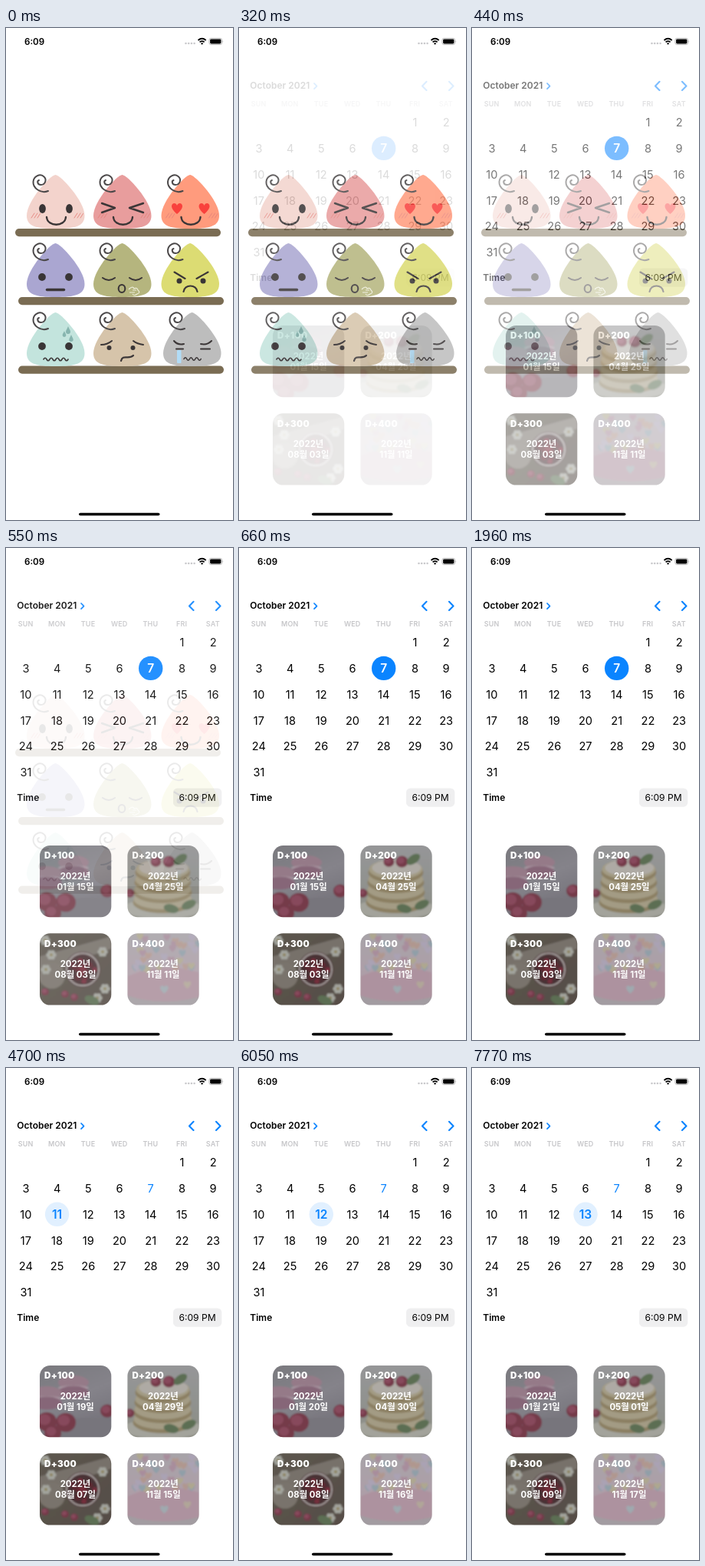
Write an HTML page that moves like this. It is 296x640 px and loops after 8 s.

```html
<!DOCTYPE html>
<html lang="en">
<head>
<meta charset="utf-8">
<title>Baby day calendar</title>
<style>
  html, body { margin: 0; width: 100%; height: 100%; overflow: hidden; background: #fff; }
  svg { display: block; width: 100%; height: 100%; font-family: Inter, "Noto Sans CJK KR", "Noto Sans CJK", sans-serif; }
  .ink { fill: none; stroke: #3b3637; stroke-width: 2.4; stroke-linecap: round; stroke-linejoin: round; }
  .curl { fill: none; stroke: #4b4849; stroke-width: 2; stroke-linecap: round; }
  .blush { fill: none; stroke: #e5827c; stroke-width: .9; stroke-linecap: round; }
  .mid { text-anchor: middle; }
  .day { font-size: 14.6px; text-anchor: middle; }
  .chosen { font-size: 15.6px; font-weight: 600; }
  .week { font-size: 9px; font-weight: 600; fill: #c6c6c9; text-anchor: middle; letter-spacing: .15px; }
  .label { font-size: 12px; font-weight: 600; }
  .count { font-size: 11.6px; font-weight: 900; fill: #fff; letter-spacing: .3px; }
  .date { font-size: 11.4px; font-weight: 700; fill: #fff; text-anchor: middle; }
  .arrow { fill: none; stroke: #0a84ff; stroke-linecap: round; stroke-linejoin: round; }
  #calendar { animation: appear 8s step-end infinite; }
  .pick { visibility: hidden; animation: 8s step-end infinite; }
  #pick7 { animation-name: first; }
  #pick11 { animation-name: second; }
  #pick12 { animation-name: third; }
  #pick13 { animation-name: fourth; }
  @keyframes appear { 0% { opacity: 0 } 4% { opacity: .14 } 5.375% { opacity: .53 } 6.875% { opacity: .89 } 8.25%, 100% { opacity: 1 } }
  @keyframes first { 0% { visibility: visible } 58.75%, 100% { visibility: hidden } }
  @keyframes second { 0% { visibility: hidden } 58.75% { visibility: visible } 75.625%, 100% { visibility: hidden } }
  @keyframes third { 0% { visibility: hidden } 75.625% { visibility: visible } 97.125%, 100% { visibility: hidden } }
  @keyframes fourth { 0% { visibility: hidden } 97.125%, 100% { visibility: visible } }
</style>
</head>
<body>
<svg id="stage" viewBox="0 0 296 640" preserveAspectRatio="none">
  <defs>
    <clipPath id="rounded"><rect width="93.3" height="93.3" rx="13.5"/></clipPath>
    <filter id="soft" x="-20%" y="-20%" width="140%" height="140%"><feGaussianBlur stdDeviation="1"/></filter>
    <linearGradient id="linen" x2=".4" y2="1"><stop stop-color="#77777c"/><stop offset=".55" stop-color="#85838a"/><stop offset="1" stop-color="#727078"/></linearGradient>
    <linearGradient id="cream" x2="0" y2="1"><stop stop-color="#97979a"/><stop offset=".6" stop-color="#8f918d"/><stop offset="1" stop-color="#8b8c80"/></linearGradient>
    <linearGradient id="wood" x2="1" y2="1"><stop stop-color="#5d5850"/><stop offset="1" stop-color="#554c45"/></linearGradient>
    <linearGradient id="frosting" x2="0" y2="1"><stop stop-color="#a6a4a8"/><stop offset=".5" stop-color="#ad9fa8"/><stop offset="1" stop-color="#a8969f"/></linearGradient>
  </defs>
  <g id="shelves"></g>
  <g id="calendar"></g>
  <g id="chrome">
    <text x="24" y="21.7" font-size="11.6" font-weight="600">6:09</text>
    <g fill="#c9c9cc"><circle cx="234.5" cy="20" r="1.3"/><circle cx="238.2" cy="20" r="1.3"/><circle cx="241.9" cy="20" r="1.3"/><circle cx="245.6" cy="20" r="1.3"/></g>
    <g fill="none" stroke="#000" stroke-width="1.8"><path d="M250.5 16q5.1-4.4 10.2 0M252.6 18.4q3-2.5 6 0"/></g>
    <path d="M253.9 20q1.7-1.3 3.4 0l-1.7 1.8z"/>
    <rect x="264.9" y="13.4" width="16.7" height="8.2" rx="2.4" fill="none" stroke="#aaa" stroke-width=".8"/>
    <rect x="266.1" y="14.6" width="14.3" height="5.8" rx="1.4"/>
    <path d="M282.5 16.1q1.5 1.4 0 2.8z" fill="#aaa"/>
    <rect x="95" y="630.7" width="105.5" height="3.6" rx="1.8"/>
  </g>
</svg>
<script>
const $ = id => document.getElementById(id);
const ink = (d, width = 2.4) => `<path class="ink" style="stroke-width:${width}" d="${d}"/>`;
const oval = (x, y, rx, ry = rx, fill = '#393536') => `<ellipse cx="${x}" cy="${y}" rx="${rx}" ry="${ry}" fill="${fill}"/>`;
const eyes = (y, rx, ry, left = 20, right = 55) => oval(left, y, rx, ry) + oval(right, y, rx, ry);
const text = (cls, x, y, content, more = '') => `<text class="${cls}" x="${x}" y="${y}" ${more}>${content}</text>`;
const wave = (x, y, step, count) => `M${x} ${y}q${step / 2}-3.6 ${step} 0` + `t${step} 0`.repeat(count - 1);

// Faces use coordinates relative to the top left of each body.
const blush = [6, 62].map(x => `<path class="blush" d="M${x} 56l4-6m0 6l4-6m0 6l3.5-5.5"/>`).join('');
const smile = ink('M26 55C27 68 50 68 51 55');
const heart = (x, y, s, fill) =>
  `<path transform="translate(${x} ${y}) scale(${s})" fill="${fill}" d="M0 7C-5 3-7-1-7-3C-7-8-1-8 0-4C1-8 7-8 7-3C7-1 5 3 0 7Z"/>`;
const drop = (x, y, s, fill) =>
  `<path transform="translate(${x} ${y}) scale(${s})" fill="${fill}" d="M0-5C1-2 3 0 3 2A3 3 0 0 1-3 2C-3 0-1-2 0-5Z"/>`;

const babies = [
  [27, 191, '#f3d3cc', eyes(44, 4.4, 6, 20.5, 55.5) + smile + blush],
  [114, 191, '#e89d9d', ink('M11 37L28 43L11 49M65 37L47 43L65 49') + smile + blush],
  [202.5, 191, '#ff9b7d', heart(20.5, 44, 1, '#f9413d') + heart(56, 44, 1, '#f9413d') + smile + blush],
  [27, 280, '#aaa6d1', eyes(44, 4.9) + ink('M26.5 60.5H48.5', 3.5)],
  [114, 280, '#b5b57e', ink('M12 45Q20 51 28 45M47 45Q55 51 63 45', 2.1) +
    '<ellipse class="ink" style="stroke-width:2.1" cx="37" cy="59" rx="4.3" ry="5"/>' +
    '<path d="M46 60q5-5 7-1q4-2 5 2q4 3-1 5q-4 3-6 0m-4-2h7m-3-3h5" fill="none" stroke="#eeeedb" stroke-width="1.2"/>'],
  [202.5, 280, '#dcdc73', ink('M17 37.5L31 46M61 37.5L46 46', 2.1) + eyes(49, 3.5, 3.5, 23.5, 54.5) +
    ink('M29 63C30 53 46 53 47 63', 2.2)],
  [27, 370, '#c3e4dd', eyes(44, 4.9) + ink(wave(22, 61, 4, 8), 1.6) +
    drop(54, 23, 1, '#87b5af') + drop(49, 28, .8, '#87b5af') + drop(58, 33.5, .9, '#87b5af')],
  [114, 370, '#d6c4aa', ink('M10 42Q18 42 24 37M52 37Q57 41 65 42', 2) + eyes(46, 3, 3, 20.5, 51.5) +
    ink('M36 63C38 54 46 62 52 56', 2.2)],
  [205, 370, '#bdbdbd', ink('M14 37Q19 43 27 41M49 41Q57 43 63 37M17 47.5H26M49 47.5H61', 2) +
    '<rect x="18" y="49" width="5.5" height="17" rx="1" fill="#b1dcf6"/>' + ink(wave(27, 60.5, 3.7, 6), 1.6)]
];
const body = 'M37.5 0C44 0 75.5 34 75.5 53C75.5 67 63 70 37.5 70C12 70 0 67 0 53C0 34 31 0 37.5 0Z';
const curl = 'M28 21C18 25 8 17 8.5 9C9 2 17-2 22 2C27 6 24 13 18.5 13C14 13 13 8 16 7';
$('shelves').innerHTML =
  [[12, 261], [16, 350], [16, 439.5]].map(([x, y]) =>
    `<rect x="${x}" y="${y}" width="268" height="10.2" rx="5.1" fill="#7a6c53"/>`).join('') +
  babies.map(([x, y, fill, face]) => `<g transform="translate(${x} ${y})">
    <path d="${body}" fill="${fill}"/><path class="curl" d="${curl}"/>${face}</g>`).join('');

// Soft stand-ins for the four dessert pictures, each about 93 by 93.
let seed = 7;
const random = () => (seed = seed * 16807 % 2147483647) / 2147483647;
const scatter = (count, draw) => Array.from({ length: count }, draw).join('');
const backdrop = id => `<rect x="-9" y="-9" width="112" height="112" fill="url(#${id})"/>`;
const berry = (x, y, r) => oval(x, y, r, r * .95, '#743a4a') + oval(x - r * .2, y - r * .2, r * .6, r * .55, '#87495c');
const macaron = (x, y, r) => oval(x, y - 6, r, r * .45, '#957a88') + oval(x, y + 1, r, 3, '#a795a0') + oval(x, y + 7, r, r * .42, '#866678');
const flower = (x, y) => scatter(6, (_, i) => oval(x + 4 * Math.cos(i * 1.05), y + 4 * Math.sin(i * 1.05), 2.6, 2.6, '#a3a49d')) + oval(x, y, 2, 2, '#8d845e');
const leaf = (x, y, turn) => `<ellipse rx="10" ry="5.5" fill="#5b6e53" transform="translate(${x} ${y}) rotate(${turn})"/>`;

const photos = [
  backdrop('linen') + macaron(44, 28, 20) + macaron(9, 42, 20) + oval(61, 82, 42, 14, '#77757c') +
    berry(88, 59, 9) + berry(9, 73, 13) + berry(34, 74, 13) + berry(17, 88, 11),
  backdrop('cream') + oval(46, 82, 52, 13, '#a3a39b') +
    [74, 61, 48, 35].map((y, i) => oval(46, y, 39 - i, 14, '#8b7f62') + oval(46, y - 4, 38 - i, 13, '#a39b84')).join('') +
    oval(47, 29, 32, 11, '#aeaaa4') + berry(37, 21, 7) + berry(54, 21, 8) + leaf(69, 18, -35) +
    leaf(57, 82, 15) + leaf(80, 77, -25) + berry(3, 62, 6),
  backdrop('wood') + '<path d="M0 30L93 4V20L0 52Z" fill="#77716a"/>' + oval(16, 55, 17, 17, '#79736c') +
    oval(56, 47, 23, 23, '#4a3035') +
    scatter(24, () => { const a = random() * 6.3, r = random() * 17; return oval(56 + r * Math.cos(a), 47 + r * Math.sin(a), 3.2, 3, random() < .5 ? '#742f3b' : '#5c2a33'); }) +
    '<circle cx="56" cy="47" r="21" fill="none" stroke="#a6a09e" stroke-width="2"/>' +
    flower(7, 9) + flower(82, 24) + flower(8, 47) + flower(85, 72) + flower(75, 84) + flower(15, 28) +
    berry(7, 76, 5) + berry(33, 79, 5) + berry(45, 83, 5) + leaf(68, 87, 22),
  backdrop('frosting') + '<path d="M0 56Q46 36 93 51V83Q42 95 0 81Z" fill="#ad929f"/><path d="M0 81Q42 95 93 83V103H0Z" fill="#a29ca1"/>' +
    scatter(37, (_, i) => heart(10 + random() * 83, 4 + random() * 45, .65, ['#aaa2b4', '#aea78f', '#a88d9c', '#909fa8', '#b0978f'][i % 5])) +
    heart(48, 73, .75, '#9fa9af') + heart(78, 67, .7, '#b0a698')
];

const columnX = day => 25.9 + 40.7 * ((day + 4) % 7);
const rowY = day => 122.5 + 33.9 * Math.floor((day + 4) / 7);
const number = (day, cls = '', fill = '#000') => text('day ' + cls, columnX(day), rowY(day) + (cls ? 5.6 : 5.3), day, `fill="${fill}"`);
const cards = [[44, 387], [158.4, 387], [44, 501.3], [158.4, 501.3]];
const changing = [7, 11, 12, 13];
const blue = '#0a84ff';
const two = n => String(n).padStart(2, '0');

function pick(selected) {
  const today = selected === 7;
  const numbers = changing.map(day => day === selected
    ? number(day, 'chosen', today ? '#fff' : blue)
    : number(day, '', day === 7 ? blue : '#000')).join('');
  const dates = cards.map(([x, y], i) => {
    const date = new Date(Date.UTC(2021, 9, selected + 100 * (i + 1)));
    return text('date', x + 46.5, y + 43.5, date.getUTCFullYear() + '년') +
      text('date', x + 46.5, y + 57.8, `${two(date.getUTCMonth() + 1)}월 ${two(date.getUTCDate())}일`);
  }).join('');
  return `<g class="pick" id="pick${selected}">
    <circle cx="${columnX(selected)}" cy="${rowY(selected)}" r="15.7" fill="${today ? blue : '#e1f0ff'}"/>${numbers}${dates}</g>`;
}

$('calendar').innerHTML = '<rect width="296" height="640" fill="#fff"/>' +
  text('label', 14.3, 79.3, 'October 2021') +
  '<path class="arrow" stroke-width="1.7" d="M98 72l3.5 3.6l-3.5 3.6"/>' +
  '<path class="arrow" stroke-width="2.1" d="M244.5 69.8l-5.5 5.6l5.5 5.6M274 69.8l5.5 5.6l-5.5 5.6"/>' +
  ['SUN', 'MON', 'TUE', 'WED', 'THU', 'FRI', 'SAT'].map((name, i) => text('week', 25.6 + 40.7 * i, 102.2, name)).join('') +
  Array.from({ length: 31 }, (_, i) => i + 1).filter(day => !changing.includes(day)).map(day => number(day)).join('') +
  text('label', 14.3, 328.7, 'Time') +
  '<rect x="218" y="312.5" width="63.3" height="24.2" rx="5.5" fill="#efeff0"/>' +
  text('mid', 249.6, 328.9, '6:09 PM', 'font-size="12.1"') +
  cards.map(([x, y], i) => `<g transform="translate(${x} ${y})"><g clip-path="url(#rounded)"><g filter="url(#soft)">${photos[i]}</g></g>
    ${text('count', 6, 17.3, `D+${i + 1}00`)}</g>`).join('') +
  changing.map(pick).join('');
</script>
</body>
</html>
```
